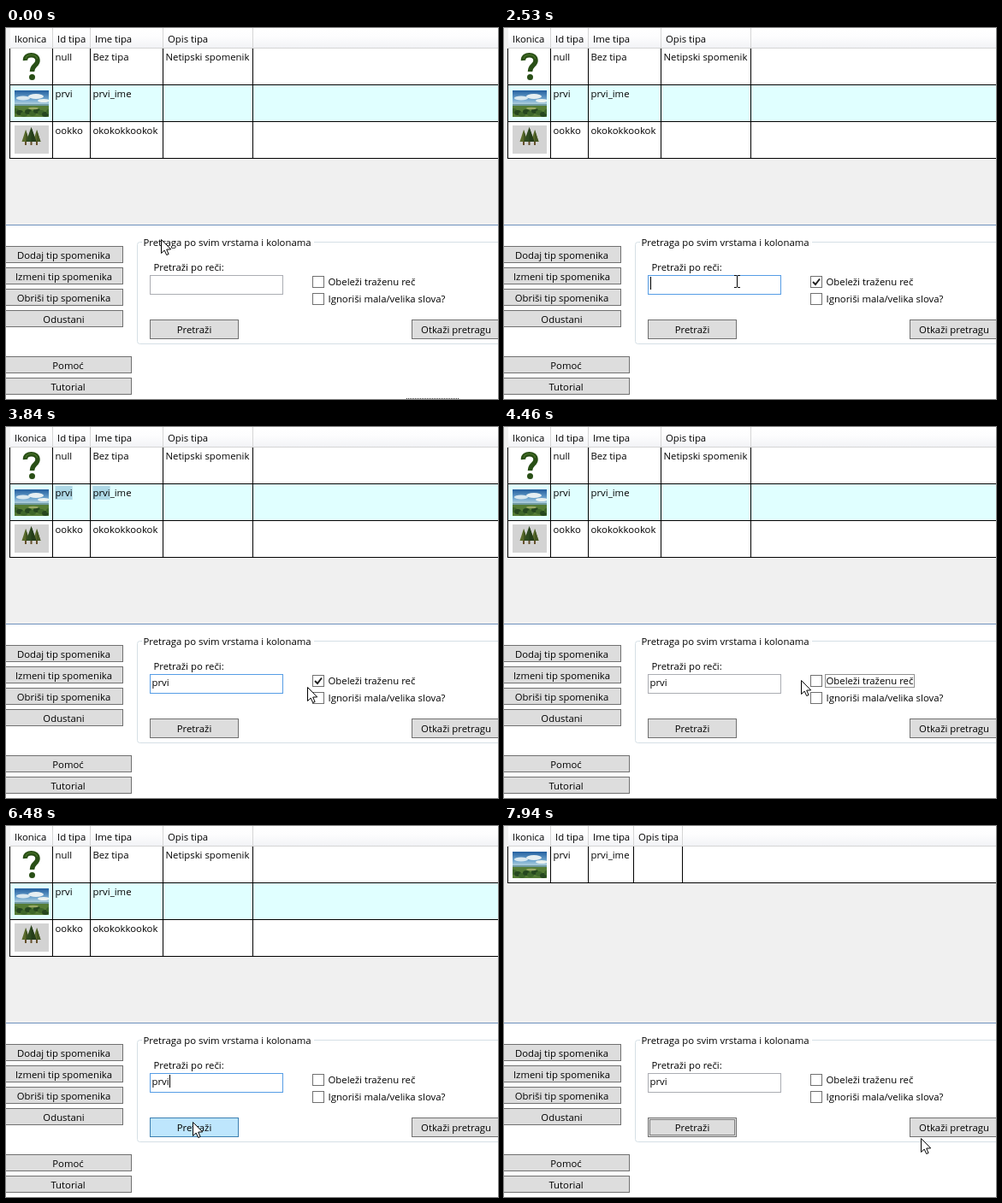
Write an HTML page with a canvas that moves like this. It is 575x434 px and loops after 8 s.

```html
<!DOCTYPE html>
<html lang="sr">
<head>
<meta charset="utf-8">
<title>Pretraga</title>
<style>
html, body { margin: 0; width: 100%; height: 100%; overflow: hidden; background: #fff; }
canvas { display: block; width: 575px; height: 434px; }
</style>
</head>
<body>
<canvas id="stage" width="575" height="434"></canvas>
<script>
const ctx = document.getElementById('stage').getContext('2d');
const LOOP = 8000;
const FONT = '11.35px "Open Sans", "Noto Sans", sans-serif';

// Pointer moves: start, end, number of steps, destination x, y
const START = [181, 247];
const MOVES = [
  [420, 650, 4, 315, 275], [880, 1190, 5, 360, 291], [1420, 1420, 1, 360, 294],
  [1980, 2280, 5, 270, 296], [2530, 2530, 1, 272, 296],
  [3550, 3700, 3, 336, 308], [3770, 3840, 2, 352, 304], [3920, 4000, 2, 361, 297],
  [4380, 4840, 7, 289, 293], [5250, 5390, 3, 223, 294],
  [5470, 5700, 4, 216, 297], [5780, 5940, 3, 227, 293],
  [6170, 6250, 2, 219, 333], [6400, 6480, 2, 218, 346],
  [7090, 7400, 5, 234, 322], [7630, 7940, 5, 487, 365]
];
const KEYS = [2770, 2920, 3000, 3080];
const ROWS = [
  { icon: drawQuestion, cells: ['null', 'Bez tipa', 'Netipski spomenik'] },
  { icon: drawLandscape, cells: ['prvi', 'prvi_ime', ''], fill: '#e0ffff' },
  { icon: drawTrees, cells: ['ookko', 'okokokkookok', ''] }
];
const HEADS = ['Ikonica', 'Id tipa', 'Ime tipa', 'Opis tipa'];
const SEARCH = { x: 168, y: 341, w: 104, h: 23 };
const INPUT = { x: 168, y: 289, w: 156, h: 23 };
const CHECK = { x: 358, y: 290, w: 14, h: 14 };

const between = (t, a, b) => t >= a && t < b;
const inside = (p, r) => p.x >= r.x && p.x < r.x + r.w && p.y >= r.y && p.y < r.y + r.h;

function rect(x, y, w, h, fill) {
  ctx.fillStyle = fill;
  ctx.fillRect(x, y, w, h);
}

function box(r, fill, border) {
  rect(r.x, r.y, r.w, r.h, border);
  rect(r.x + 1, r.y + 1, r.w - 2, r.h - 2, fill);
}

function text(str, x, y, align = 'left') {
  ctx.fillStyle = '#000';
  ctx.textAlign = align;
  ctx.fillText(str, x, y);
}

function shape(points, fill, stroke) {
  ctx.beginPath();
  points.forEach(([x, y]) => ctx.lineTo(x, y));
  ctx.closePath();
  ctx.fillStyle = fill;
  ctx.fill();
  if (stroke) {
    ctx.strokeStyle = stroke;
    ctx.lineWidth = 1;
    ctx.stroke();
  }
}

function ellipse(x, y, rx, ry, fill) {
  ctx.beginPath();
  ctx.ellipse(x, y, rx, ry, 0, 0, 7);
  ctx.fillStyle = fill;
  ctx.fill();
}

function dotted(x, y, w, h, dash) {
  ctx.strokeStyle = '#222';
  ctx.lineWidth = 1;
  ctx.setLineDash(dash);
  ctx.strokeRect(x + .5, y + .5, w - 1, h - 1);
  ctx.setLineDash([]);
}

function drawQuestion(y) {
  ctx.strokeStyle = '#294f16';
  ctx.lineWidth = 5.5;
  ctx.beginPath();
  ctx.moveTo(22.5, y + 14);
  ctx.bezierCurveTo(22, y + 5.5, 37, y + 5.5, 37, y + 14);
  ctx.bezierCurveTo(37, y + 20, 30.5, y + 19, 30.5, y + 27);
  ctx.stroke();
  ellipse(30.5, y + 33.5, 3.5, 3.5, '#294f16');
  ctx.strokeStyle = '#4b7629';
  ctx.lineWidth = 1.2;
  ctx.beginPath();
  ctx.moveTo(23, y + 12);
  ctx.bezierCurveTo(24, y + 6, 35, y + 6, 36.5, y + 12);
  ctx.stroke();
}

function drawLandscape(y) {
  const top = y + 6;
  const sky = ctx.createLinearGradient(0, top, 0, top + 18);
  sky.addColorStop(0, '#235f9f');
  sky.addColorStop(.6, '#73a9d0');
  sky.addColorStop(1, '#c6dce0');
  rect(10, top, 40, 31, sky);
  ctx.save();
  ctx.beginPath();
  ctx.rect(10, top, 40, 31);
  ctx.clip();
  ellipse(20, top + 9, 8, 2.5, '#d9e8ef');
  ellipse(35, top + 7, 9, 3, '#e6eff2');
  ellipse(44, top + 12, 7, 2, '#eaf1ef');
  rect(10, top + 16, 40, 3, '#6f9aa0');
  rect(10, top + 18, 40, 13, '#557c36');
  for (let i = 0; i < 9; i++) {
    const x = 11 + i * 5;
    ellipse(x, top + 24 + i * 7 % 5, 4, 3, i % 2 ? '#26471f' : '#3e672a');
  }
  ellipse(32, top + 21, 6, 1.3, '#9aaa66');
  ctx.restore();
}

function drawTrees(y) {
  rect(10, y + 4, 40, 33, '#d3d3d3');
  [[23, 9, 4.5], [36, 9, 4.5], [29.5, 6, 6]].forEach(([x, top, half], i) => {
    rect(x - 1, y + 22, 2, 5, '#65502b');
    shape([[x, y + top], [x + half, y + 23], [x - half, y + 23]], i < 2 ? '#5b6b2c' : '#2f4a20');
    shape([[x, y + top], [x + half, y + 23], [x, y + 23]], i < 2 ? '#435522' : '#263d1a');
  });
}

function drawCell(str, x, y, query) {
  for (let i = query ? str.indexOf(query) : -1; i >= 0; i = str.indexOf(query, i + 1)) {
    const left = x + ctx.measureText(str.slice(0, i)).width;
    rect(left, y + 2, ctx.measureText(query).width, 16, '#add8e6');
  }
  text(str, x, y + 14);
}

function drawTable(filtered, query) {
  const cols = filtered ? [54, 98, 151, 208] : [54, 98, 183, 288];
  const rows = filtered ? [{ ...ROWS[1], fill: '#fff' }] : ROWS;
  const starts = [5, ...cols];
  const bottom = 24 + rows.length * 43;

  rect(0, 0, 575, 230, '#f0f0f0');
  const head = ctx.createLinearGradient(0, 0, 0, 23);
  head.addColorStop(0, '#fff');
  head.addColorStop(.45, '#fdfdfe');
  head.addColorStop(1, '#f2f3f6');
  rect(5, 0, 570, 23, head);
  rect(5, 23, 570, 1, '#d5d5d5');
  HEADS.forEach((name, i) => {
    text(name, starts[i] + (i ? 6 : 5), 17);
    rect(cols[i], 0, 1, 24, '#d5d5d5');
  });

  rows.forEach((row, r) => {
    const y = 24 + r * 43;
    rect(5, y, 570, 42, row.fill || '#fff');
    row.icon(y);
    row.cells.forEach((cell, i) => drawCell(cell, cols[i] + 3.5, y, query));
    rect(5, y + 42, 570, 1, '#000');
  });
  [4, ...cols].forEach(x => rect(x, 24, 1, bottom - 24, '#000'));
  rect(0, 230, 575, 1, '#6e90bd');
}

function drawButton(r, label, cx, state = '') {
  const [fill, border] = {
    hover: ['#bee6fd', '#3c7fb1'], pressed: ['#c4e5f6', '#2c628b']
  }[state] || ['#ddd', '#707070'];
  box(r, fill, border);
  text(label, cx, r.y + (r.h > 20 ? 16 : 15), 'center');
}

function drawCheck(y, label, state, checked) {
  const [fill, border] = {
    hover: ['#f3f9ff', '#5593ff'], pressed: ['#d9ecff', '#3c77dd']
  }[state] || ['#fff', '#707070'];
  box({ ...CHECK, y }, fill, border);
  if (checked) {
    ctx.strokeStyle = '#212121';
    ctx.lineWidth = 2;
    ctx.beginPath();
    ctx.moveTo(361, y + 7);
    ctx.lineTo(364, y + 10);
    ctx.lineTo(369, y + 3.5);
    ctx.stroke();
  }
  text(label, 376.5, y + 11);
}

function drawForm(t, pointer, typed, checked) {
  rect(0, 231, 575, 203, '#fff');
  ['Dodaj tip spomenika', 'Izmeni tip spomenika', 'Obriši tip spomenika', 'Odustani']
    .forEach((label, i) => drawButton({ x: -5, y: 255 + i * 25, w: 142, h: 20 }, label, 67.5));
  ['Pomoć', 'Tutorial']
    .forEach((label, i) => drawButton({ x: -5, y: 384 + i * 25, w: 152, h: 20 }, label, 72.5));

  ctx.strokeStyle = '#d5dfe5';
  ctx.lineWidth = 1;
  ctx.beginPath();
  ctx.roundRect(153.5, 250.5, 440, 119, 3);
  ctx.stroke();
  rect(159, 249, 201, 3, '#fff');
  text('Pretraga po svim vrstama i kolonama', 160.5, 255);
  text('Pretraži po reči:', 172.5, 284);

  const first = between(t, 2360, 4150), second = between(t, 5010, 6560);
  const border = first || second ? '#569de5' : inside(pointer, INPUT) ? '#7eb4ea' : '#abadb3';
  box(INPUT, '#fff', border);
  text(typed, 170.5, 303);
  const since = second ? t - 5080 : t - (t < 2770 ? 2360 : 3080);
  if ((first || second) && (since < 0 || since % 1060 < 530)) {
    rect(Math.round(170.5 + ctx.measureText(typed).width), 291, 1, 15, '#000');
  }

  const pressing = between(t, 1820, 1900) || between(t, 4080, 4150);
  const overCheck = inside(pointer, CHECK) && t >= 1420;
  drawCheck(290, 'Obeleži traženu reč', pressing ? 'pressed' : overCheck ? 'hover' : '', checked);
  drawCheck(310, 'Ignoriši mala/velika slova?', '', false);
  if (between(t, 4150, 5010)) dotted(375, 289, 105, 16, [1, 1]);

  const pressed = between(t, 6560, 6630);
  drawButton(SEARCH, 'Pretraži', 220, pressed ? 'pressed' : inside(pointer, SEARCH) ? 'hover' : '');
  if (t >= 6560) dotted(170, 343, 100, 19, [1, 1]);
  drawButton({ x: 474, y: 341, w: 110, h: 23 }, 'Otkaži pretragu', 526);

  if (t < 1900) for (let x = 468; x < 529; x += 2) rect(x, 433, 1, 1, '#333');
}

function pointerAt(t) {
  let [x, y] = START;
  for (const [start, end, steps, toX, toY] of MOVES) {
    if (t < start) break;
    const gap = (end - start) / (steps - 1) || 1;
    const p = Math.min(steps, Math.floor((t - start) / gap + .06) + 1) / steps;
    const ease = p * p * (3 - 2 * p);
    x += (toX - x) * ease;
    y += (toY - y) * ease;
  }
  return { x: Math.round(x), y: Math.round(y) };
}

function drawPointer({ x, y }) {
  if (inside({ x, y }, INPUT)) {
    rect(x, y - 6, 1, 13, '#000');
    [-7, 7].forEach(dy => {
      rect(x - 3, y + dy, 3, 1, '#000');
      rect(x + 1, y + dy, 3, 1, '#000');
    });
    return;
  }
  const outline = [[0, 0], [0, 16], [3.7, 12.6], [6.2, 18], [8.6, 17], [6.2, 11.6], [11.2, 11.4]];
  shape(outline.map(([dx, dy]) => [x + dx + .5, y + dy + .5]), '#fff', '#000');
}

function draw(t) {
  ctx.font = FONT;
  const pointer = pointerAt(t);
  const typed = 'prvi'.slice(0, KEYS.filter(k => t >= k).length);
  const checked = between(t, 1900, 4150);
  drawTable(t >= 6710, checked ? typed : '');
  drawForm(t, pointer, typed, checked);
  if (!between(t, 2770, 3550)) drawPointer(pointer);
}

const origin = performance.now();
function frame() {
  draw((performance.now() - origin) % LOOP);
  requestAnimationFrame(frame);
}
frame();
</script>
</body>
</html>
```
